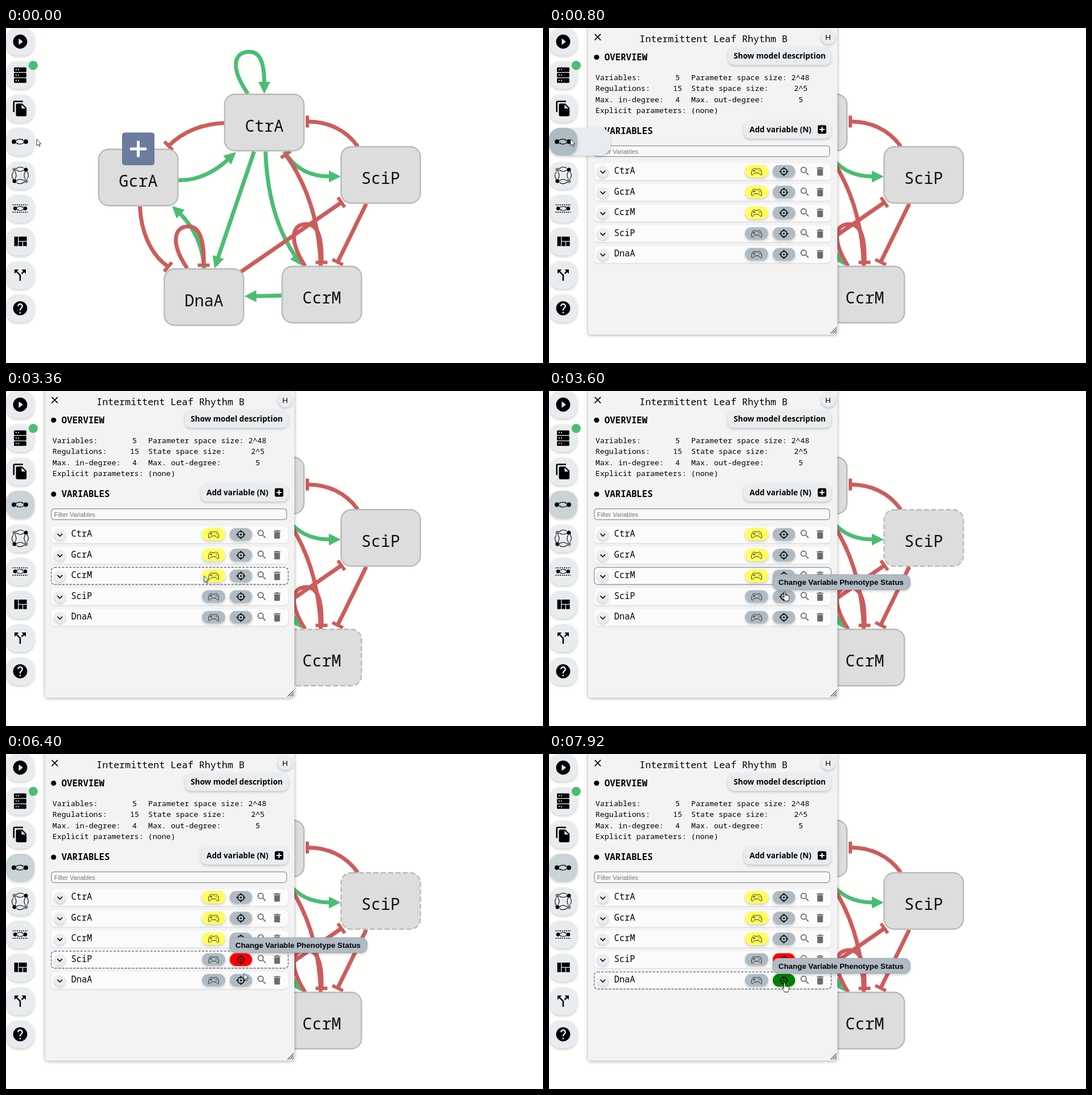
Animation of 948 by 591 pixels, one loop 8 s. Source, as an HTML page:

```html
<!DOCTYPE html>
<html lang="en">
<head>
<meta charset="utf-8">
<title>Regulatory network editor</title>
<style>
  html, body { margin: 0; width: 100%; height: 100%; overflow: hidden; background: #fffffd; }
  svg { display: block; width: 948px; height: 591px; }
  text { white-space: pre; }
  .mono { font-family: "Noto Sans Mono", "DejaVu Sans Mono", monospace; }
  .ui { font: 700 13.6px "Open Sans", "Noto Sans", sans-serif; }
  .arial { font-family: "Liberation Sans", Arial, sans-serif; }
  .soft { filter: drop-shadow(0 2px 2px rgba(0, 0, 0, .2)); }
  .faint { filter: drop-shadow(0 1px 1px rgba(0, 0, 0, .12)); }
  .edge { fill: none; stroke-width: 7; }
</style>
</head>
<body>
<svg id="stage" viewBox="0 0 948 591" xmlns="http://www.w3.org/2000/svg"></svg>
<script>
const LOOP = 8000, STEP = 80;
const GREEN = '#4abd73', RED = '#cd5c5c', GREY = '#afbbc2';

const rect = (x, y, w, h, r, fill, extra = '') =>
  `<rect x="${x}" y="${y}" width="${w}" height="${h}" rx="${r}" fill="${fill}" ${extra}/>`;
const dot = (x, y, r, fill = '#000', extra = '') =>
  `<circle cx="${x}" cy="${y}" r="${r}" fill="${fill}" ${extra}/>`;
const line = (d, color = '#000', w = 1, extra = '') =>
  `<path d="${d}" fill="none" stroke="${color}" stroke-width="${w}" ${extra}/>`;
const label = (x, y, str, size, cls = 'mono', extra = '') =>
  `<text x="${x}" y="${y}" class="${cls}" font-size="${size}" ${extra}>${str}</text>`;
const group = (id, body) => `<g id="${id}">${body}</g>`;

// Icons live on a 24 unit grid and are centred on (x, y).
const ICONS = {
  play: 'M12 2a10 10 0 1 0 0 20a10 10 0 1 0 0-20zM10 16.5v-9l6 4.5z',
  copy: 'M16 1H4c-1.1 0-2 .9-2 2v14h2V3h12zM15 5l6 6v10c0 1.1-.9 2-2 2H8c-1.1 0-2-.9-2-2V7c0-1.1.9-2 2-2zM14 12h5.5L14 6.5z',
  quilt: 'M10 18h5v-6h-5zM4 18h5V5H4zM16 18h5v-6h-5zM10 5v6h11V5z',
  split: 'M14 4l2.3 2.3-2.9 2.9 1.4 1.4 2.9-2.9L20 10V4zM10 4H4v6l2.3-2.3 4.7 4.7V20h2v-8.4L7.7 6.3z',
  help: 'M12 2a10 10 0 1 0 0 20a10 10 0 1 0 0-20zM13 19h-2v-2h2zM15.1 11.2l-.9.9C13.4 12.9 13 13.5 13 15h-2v-.5c0-1.1.4-2.1 1.2-2.8l1.2-1.3c.4-.4.6-.9.6-1.4a2 2 0 0 0-4 0H8a4 4 0 0 1 8 0c0 .9-.4 1.7-.9 2.2z',
  search: 'M15.5 14h-.8l-.3-.3A6.5 6.5 0 1 0 13.7 14.4l.3.3v.8l5 5 1.5-1.5zM9.5 14a4.5 4.5 0 1 1 0-9a4.5 4.5 0 0 1 0 9z',
  bin: 'M6 19c0 1.1.9 2 2 2h8c1.1 0 2-.9 2-2V7H6zM19 4h-3.5l-1-1h-5l-1 1H5v2h14z',
  close: 'M19 6.4L17.6 5 12 10.6 6.4 5 5 6.4 10.6 12 5 17.6 6.4 19 12 13.4 17.6 19 19 17.6 13.4 12z',
  more: 'M16.6 8.6L12 13.2 7.4 8.6 6 10l6 6 6-6z'
};
const icon = (name, x, y, k, fill = '#000') =>
  `<path transform="translate(${x} ${y}) scale(${k}) translate(-12 -12)" fill="${fill}" fill-rule="evenodd" d="${ICONS[name]}"/>`;

// ---- network ----
const NODES = [
  ['CtrA', 386, 117], ['GcrA', 163.5, 214], ['SciP', 591.5, 209.5],
  ['DnaA', 279.5, 425], ['CcrM', 487.5, 420.5]
];
const node = ([name, x, y]) =>
  rect(x, y, 140, 99.5, 18, '#ddd', `id="node${name}" stroke="#b8bab9" stroke-width="2.4"`) +
  label(x + 70, y + 65.5, name, 28.5, 'mono', 'text-anchor="middle" fill="#111"');

// [path, end x, end y, direction of travel in degrees]
const ACTIVATE = [
  ['M427 116C394 68 403 42 430 42C452 42 456 70 456 98', 456, 116, 90],
  ['M304 268.5C338 270 370 253 394 230', 406, 219, -42],
  ['M491 218C512 250 538 262 573 262', 591, 262, 0],
  ['M438 218L374 406', 368, 424, 109],
  ['M458 218Q462.5 333 511 403', 522, 419, 55],
  ['M350 425C348 390 335 355 306 326', 293, 314, -137],
  ['M487 472L440 473', 421, 473.3, 179]
];
const INHIBIT = [
  ['M386 167.5C348 169 315 181 288 207', 287, 208, 136],
  ['M621 209C599 178 566 165 533 165', 532, 165, 180],
  ['M555.7 420Q551.5 304 494 224', 494, 223, -125],
  ['M528 420C499 374 504 346 530 346C553 346 558 375 557 413', 557, 413.5, 90],
  ['M236.5 315C238 358 255 399 285 420', 286, 421.5, 40],
  ['M320 424C289 379 297 350 322 350C344 350 350 380 349 418', 349, 418.5, 90],
  ['M415 430L591 308.5', 592, 307.5, -35],
  ['M636 310L586 412', 585.5, 413, 116]
];
const edges = (list, color, tip) => list.map(([d, x, y, a]) =>
  `<path class="edge" stroke="${color}" d="${d}"/>` +
  `<path d="${tip}" fill="${color}" transform="translate(${x} ${y}) rotate(${a})"/>`).join('');

const network = edges(ACTIVATE, GREEN, 'M0 0L-21 -10.5V10.5Z') +
  edges(INHIBIT, RED, 'M-3 -10.5H3V10.5H-3Z') + NODES.map(node).join('') +
  rect(205.5, 185, 56, 56.5, 4, '#6b7c9f', 'stroke="#5c6e95"') +
  line('M219 213.2H248M233.5 199V227.5', '#fff', 5);

// ---- panel ----
const ROWS = ['CtrA', 'GcrA', 'CcrM', 'SciP', 'DnaA'];
const rowY = i => 253.2 + 36.55 * i;

const pad = (x, y) => `<g transform="translate(${x} ${y})" fill="none" stroke="#222" stroke-width="1">
  <path d="M-5 -5.5C-3 -6 -2.5 -4.5 -1.5 -4.5H1.5C2.5 -4.5 3 -6 5 -5.5C8 -4.5 9.5 2 9 5C8.5 7.5 6 5.5 3.5 2.5H-3.5C-6 5.5 -8.5 7.5 -9 5C-9.5 2 -8 -4.5 -5 -5.5Z"/>
  <path d="M-6.5 -1.5H-2.5M-4.5 -3.5V.5M3 -1.5H4M5.5 -1.5H6.5M4.8 -3.5V-2.7M4.8 -.3V.5"/></g>`;
const aim = (x, y) => dot(x, y, 5.6, 'none', 'stroke="#111" stroke-width="1.7"') + dot(x, y, 1.6, '#111') +
  line(`M${x - 8} ${y}h4M${x + 4} ${y}h4M${x} ${y - 8}v4M${x} ${y + 4}v4`, '#111', 1.7);

const row = (name, i) => {
  const y = rowY(i);
  return rect(80, y - 15, 418, 30, 7, '#fbfbfb', 'class="faint"') +
    rect(79.8, y - 15, 418.4, 30, 6, 'none', `id="ring${name}" stroke-width="1.5"`) +
    dot(95, y + .6, 10, '#eaedf0', 'class="soft"') + icon('more', 95, y + .8, .82) +
    label(115, y + 3.8, name, 15.4) +
    rect(346, y - 11.4, 41, 22, 11, i < 3 ? '#ffff5c' : GREY, 'class="soft"') + pad(366.5, y) +
    rect(395, y - 11.4, 39.5, 22.5, 11, GREY, `id="aim${name}" class="soft"`) + aim(414.6, y) +
    icon('search', 451.7, y - .7, .84, '#666') + icon('bin', 478.6, y - .2, .84, '#6b6b6b');
};

const STATS = [
  ['Variables:', 91.5, '5', 227, 'Parameter space size: 2^48', '', 0],
  ['Regulations:', 111, '15', 227, 'State space size:', '2^5', 444.5],
  ['Max. in-degree:', 130.5, '4', 227, 'Max. out-degree:', '5', 444.5]
];
const stat = ([a, y, b, bx, c, d, dx]) => label(82, y, a, 13.4) +
  label(bx, y, b, 13.4, 'mono', 'text-anchor="middle"') + label(251, y, c, 13.4) +
  label(dx, y, d, 13.4, 'mono', 'text-anchor="middle"');
const heading = (y, str) => dot(84, y, 4.6) +
  label(98, y + 5, str, 15.8, 'mono', 'font-weight="700"');

const panel = rect(69, -8, 440, 549, 5, '#f3f3f3', 'style="filter:drop-shadow(0 1px 3px rgba(0,0,0,.35))"') +
  icon('close', 86, 16, .84) +
  label(290.5, 25, 'Intermittent Leaf Rhythm B', 16.75, 'mono', 'text-anchor="middle"') +
  dot(493, 15.5, 13, '#eaedf0', 'class="soft"') +
  label(492.7, 20.5, 'H', 13.5, 'arial', 'text-anchor="middle"') +
  heading(51.5, 'OVERVIEW') +
  rect(316, 34, 182, 31, 10, '#eaedef', 'class="soft"') + label(326, 53.5, 'Show model description', 13.6, 'ui') +
  STATS.map(stat).join('') + label(82, 150, 'Explicit parameters: (none)', 13.4) +
  heading(182, 'VARIABLES') +
  rect(344, 164, 154, 31, 10, '#eaedef', 'class="soft"') + label(354, 184, 'Add variable (N)', 13.6, 'ui') +
  rect(474.5, 171.5, 15, 15, 2.5, '#000') + line('M477.5 179H486.5M482 174.5V183.5', '#fff', 2) +
  rect(80, 207.8, 415.5, 19, 5, '#f8f8f8', 'stroke="#8d8d8d" stroke-width="1.2"') +
  label(85, 221.5, 'Filter Variables', 11, 'arial', 'fill="#757575"') +
  ROWS.map(row).join('') +
  line('M497 539L508 528M501 539L508 532M505 539L508 536', '#555', 1.2);

// ---- side menu ----
const arcs = y => dot(14, y, 4) + dot(35, y, 4) +
  line(`M17 ${y - 2}Q24 ${y - 6} 30 ${y - 3}M32 ${y + 2}Q25 ${y + 6} 19 ${y + 3}`, '#000', 1.2) +
  `<path d="M31 ${y - 2}l-3 .2 1.6-3zM18 ${y + 2}l3-.2-1.6 3z"/>`;
const server = [69.5, 79, 88.5].map(y => rect(14, y, 22, 8.2, 1.5, '#000') +
  dot(18, y + 4, 1.1, '#fff') + dot(22, y + 4, 1.1, '#fff')).join('');
const ring = dot(15, 250, 3.6, '#777') + dot(35, 250, 3.6) + dot(15, 270, 3.6) + dot(35, 270, 3.6, '#777') +
  line('M18 248Q25 243 31 247M37 253Q42 260 37 266M32 272Q25 277 19 273M13 267Q8 260 13 254M19 251Q25 255 31 251M34 254Q30 260 34 266M31 269Q25 265 19 269M16 266Q20 260 16 254', '#000', 1.1);
const dashed = line('M11.5 312H38.5M11.5 325H38.5', '#000', 1.3, 'stroke-dasharray="2.2 1.5"') +
  `<g transform="translate(4.2 47.8) scale(.85)">${arcs(318.3)}</g>`;

const MENU = [24, 83, 142, 200.5, 260, 318.5, 377, 436, 494.5];
const menu = rect(25, 176, 25, 49, 20, '#e8ebef', 'id="hint" class="soft"') +
  MENU.map((y, i) => rect(0, y - 24.5, 50, 49, 20, '#e9ecef', `id="menu${i}" class="soft"`)).join('') +
  icon('play', 25, 24, 1.25) + server + icon('copy', 25, 142, 1.25) + arcs(200.5) + ring + dashed +
  icon('quilt', 25, 377, 1.3) + icon('split', 25, 436, 1.25) + icon('help', 25, 494.5, 1.25) +
  dot(48, 66, 8, GREEN);

const tip = rect(395, 324, 242.5, 26.5, 10, '#b0bbc4', 'class="soft" stroke="#9ea9b3"') +
  label(405, 342, 'Change Variable Phenotype Status', 13.4, 'arial', 'font-weight="700"');

const cursor = `<path id="arrow" d="M0 0V11.5L2.7 9 4.5 13 6.2 12.3 4.5 8.4H8Z" fill="#fff" stroke="#222" stroke-width=".9"/>
  <path id="hand" d="M-1.5 .5C-1.5 -1.2 1 -1.2 1 .5V5.5C1.5 4.5 3.2 4.7 3.3 6C4 5.1 5.4 5.4 5.5 6.6C6.3 6 7.6 6.5 7.6 7.8V11C7.6 12.5 6.5 13.3 6.5 15.5H-.5C-.8 13 -3 11.5 -4.3 9C-4.8 7.8 -3.2 7.2 -2.5 8.2L-1.5 9.3Z" fill="#fff" stroke="#222"/>`;

const stage = document.getElementById('stage');
stage.innerHTML = network + group('panel', panel) + menu + group('tip', tip) + group('cursor', cursor);
const $ = id => document.getElementById(id);
const set = (id, attrs) => { for (const k in attrs) $(id).setAttribute(k, attrs[k]); };
const show = (id, on) => set(id, { visibility: on ? 'visible' : 'hidden' });

// ---- timeline ----
const PATH = [
  [0, 54, 196], [320, 38, 196], [960, 38, 196], [1120, 35, 196], [1600, 51, 197],
  [2720, 51, 197], [3600, 416.5, 355], [3760, 416.5, 355], [4400, 421, 374.5],
  [6160, 421, 374.5], [6400, 420, 387], [6640, 416, 404.5], [LOOP, 416, 404.5]
];
const HINT = [[0, 50], [160, 50], [400, 168], [640, 168], [960, 50], [LOOP, 50]];

const hold = (table, t) => table.filter(s => s[0] <= t).pop()[1];
const tween = (table, t, col) => {
  const i = Math.max(1, table.findIndex(s => s[0] >= t));
  const a = table[i - 1], b = table[i];
  const p = (t - a[0]) / (b[0] - a[0]);
  return a[col] + (b[col] - a[col]) * p * p * (3 - 2 * p);
};

const HOVER = [[0, ''], [3360, 'CcrM'], [3600, 'SciP'], [6480, 'DnaA']];
const OUTLINE = [[0, ''], [3360, 'CcrM'], [3600, ''], [3680, 'SciP'], [6480, 'DnaA']];
const MENU_FILL = [[0, '#e9ecef'], [160, '#aebbc2'], [2800, '#cad4d6']];
const AIM = {
  SciP: [[0, GREY], [4880, '#008000'], [5520, '#ff0000']],
  DnaA: [[0, GREY], [7440, '#008000']]
};

function draw(t) {
  const over = hold(HOVER, t), outline = hold(OUTLINE, t);
  show('panel', t >= 640);
  set('menu3', { fill: hold(MENU_FILL, t) });
  const w = tween(HINT, t, 1);
  show('hint', w > 50);
  set('hint', { width: w - 25 });

  for (const name of ROWS) {
    const fading = name === 'CcrM' && t >= 3600 && t < 3680;
    set('node' + name, { 'stroke-dasharray': name === over ? '9 4' : 'none' });
    set('ring' + name, {
      stroke: name === outline ? '#66768a' : fading ? '#98a3ad' : 'none',
      'stroke-dasharray': fading ? 'none' : '4 2.5'
    });
  }
  for (const name in AIM) set('aim' + name, { fill: hold(AIM[name], t) });

  show('tip', t >= 3600);
  set('tip', { transform: `translate(0 ${over === 'DnaA' ? 36.5 : 0})` });

  const hand = (t >= 3520 && t < 6240) || t >= 6480;
  show('hand', hand);
  show('arrow', !hand);
  set('cursor', { transform: `translate(${tween(PATH, t, 1)} ${tween(PATH, t, 2)})` });
}

const start = performance.now();
function tick() {
  const t = (performance.now() - start) % LOOP;
  draw(Math.floor(t / STEP) * STEP);
  requestAnimationFrame(tick);
}
draw(0);
requestAnimationFrame(tick);
</script>
</body>
</html>
```
